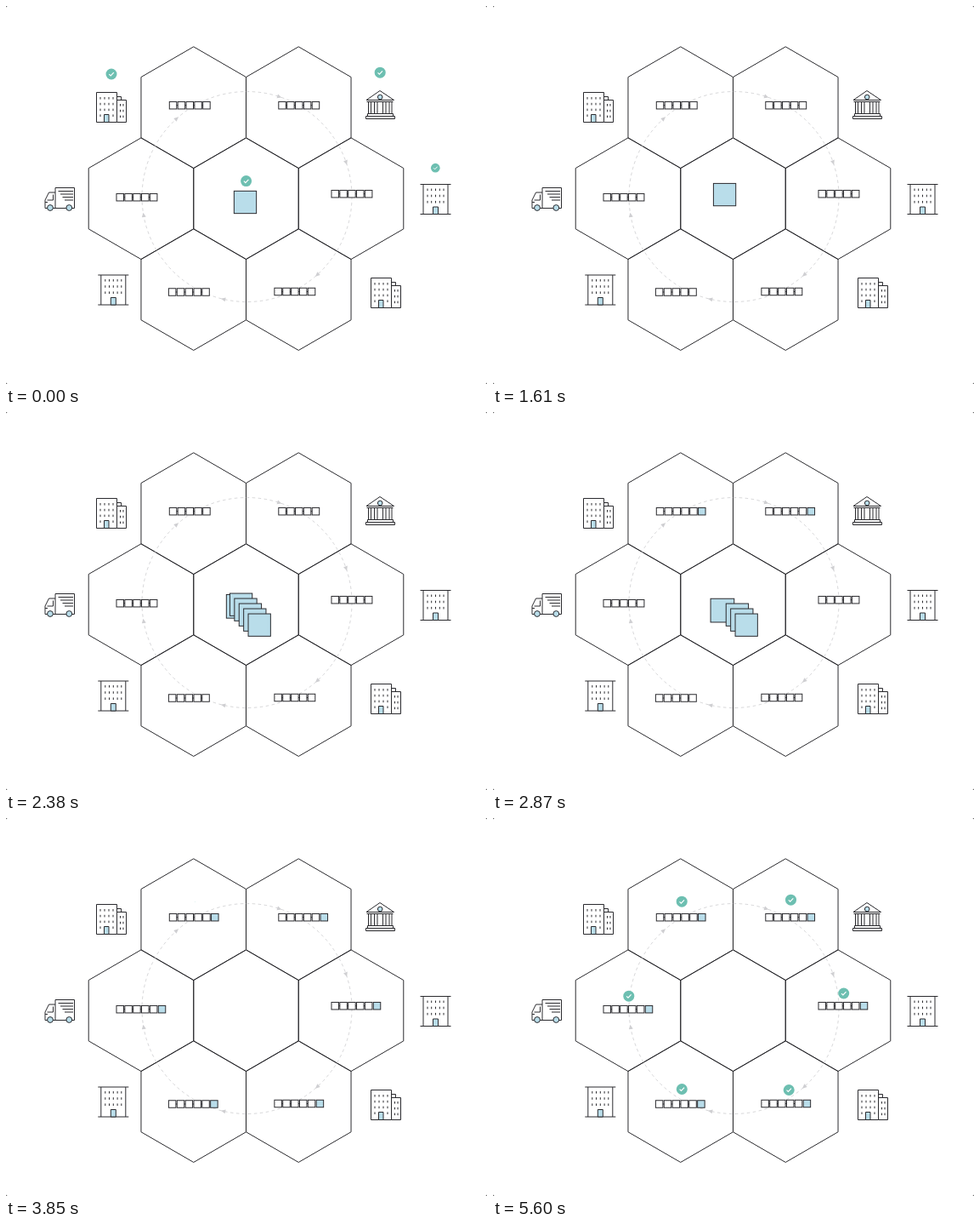
Animation, 566 px wide and 444 px high, one loop 6.09 s. Source, as an HTML page:

```html
<!DOCTYPE html>
<html lang="en">
<head>
<meta charset="utf-8">
<title>Hexagon network</title>
<style>
  html, body { margin: 0; width: 100%; height: 100%; overflow: hidden; background: #222; }
  svg { display: block; width: 100vw; height: 100vh; }
</style>
</head>
<body>
<svg id="stage" viewBox="0 0 566 444" fill="none" stroke="#2b2b2f" stroke-width="1">
  <defs>
    <g id="tower">
      <path fill="#fff" d="M24.5 5.5h5v4M24.5 9.5h11v26h-11z"/>
      <path fill="#fff" d="M.5.5h24v35H.5z"/>
      <path stroke-dasharray="2.6 4.2" d="M5 6v25M10 6v20M15 6v20M20 6v25M28.5 14v19M32 14v19"/>
      <path fill="#b9ddea" d="M9.5 26.5h5.5v9H9.5z"/>
    </g>
    <g id="office">
      <path d="M0 .5h36M0 35.5h36M3.5.5v35M32.5.5v35"/>
      <path stroke-dasharray="2.6 4.6" d="M8.5 5.5v18M13.2 5.5v18M18 5.5v18M22.8 5.5v18M27.5 5.5v18"/>
      <path fill="#b9ddea" d="M15 27h6v8.5h-6z"/>
    </g>
    <g id="tick" stroke="none">
      <circle r="6.5" fill="#6dbfb1"/>
      <path d="M-2.7.1L-.8 2 2.8-1.8" fill="none" stroke="#fff" stroke-width="1.2"/>
    </g>
  </defs>
  <rect width="566" height="444" rx="2" fill="#fff" stroke="none"/>
  <g id="hexes"></g>
  <g id="ring" stroke="#d6d6d8">
    <circle cx="283.5" cy="224" r="123.5" stroke-dasharray="3.5 3.5"/>
  </g>
  <g id="chains"></g>
  <use href="#tower" x="106" y="101"/>
  <use href="#tower" x="429" y="319"/>
  <use href="#office" x="487.5" y="209"/>
  <use href="#office" x="108.3" y="315.5"/>
  <g id="bank">
    <path d="M440 99.5L424 110.5h32.5zM424.5 112.5h31M426.5 113v13M429.5 113v13M433.5 113v13M437 113v13M443.5 113v13M447 113v13M451 113v13M454 113v13M425.5 126.5h30v3h-30zM423.5 129.5h34v3h-34z"/>
    <circle cx="440.2" cy="107" r="2.8" fill="#b9ddea"/>
  </g>
  <g id="truck">
    <path d="M58 237.5v-24h22.5v24zM58 219h-7.5l-4.5 9v9.5h12M48.5 228h7v-6.5M46 230.5h3M61.500 217.500H79M64 221H79M66.500 224.500H79M69 228H79"/>
    <circle cx="52" cy="237" r="3.4" fill="#b9ddea"/>
    <circle cx="74.300" cy="237" r="3.400" fill="#b9ddea"/>
  </g>
  <g id="squares" fill="#b9ddea"></g>
  <g id="ticks"></g>
</svg>
<script>
const LOOP = 6090, STAGGER = 245, POP = 270, FLY = 300;
const BLOCK = 8.5, PITCH = 9.85, BIG = 26.3;
const FLY_START = 2293, CHAIN_TICK_START = 3820, ICON_TICK_START = -622;
const FADE_START = 1050, FADE = 280;

// Clockwise from the upper left: left x and centre y of the blocks, then the tick
const chains = [
  { x: 192.3, y: 116.7, tick: [222.2, 98.2] },
  { x: 320.8, y: 116.7, tick: [350.5, 96.2] },
  { x: 383, y: 220.7, tick: [412.7, 206] },
  { x: 315.9, y: 335.5, tick: [348.2, 319.5] },
  { x: 191.4, y: 336, tick: [222.3, 318.5] },
  { x: 130, y: 224.7, tick: [159.8, 209.2] }
];
const iconSpots = [[124, 80], [440.2, 78.2], [505.3, 190.2], [447, 303.5], [126, 297.2], [63.2, 191.6]];
const hub = [281.5, 230.5], fanTop = [271.2, 220.2];

const $ = id => document.getElementById(id);
function add(parent, tag, attrs) {
  const el = document.createElementNS('http://www.w3.org/2000/svg', tag);
  for (const k in attrs) el.setAttribute(k, attrs[k]);
  return parent.appendChild(el);
}

const clamp = p => Math.min(1, Math.max(0, p));
const mix = (a, b, p) => a + (b - a) * p;
const smooth = p => p * p * (3 - 2 * p);
const span = (t, start, length) => clamp((t - start) / length);
const backIn = p => p * p * (2.70158 * p - 1.70158);
const pop = p => p < 0.6 ? 1.22 * (p / 0.6) ** 2 : mix(1.22, 1, smooth((p - 0.6) / 0.4));

function drawHex(cx, cy) {
  const points = [];
  for (let k = 0; k < 6; k++) {
    const a = (k * 60 - 90) * Math.PI / 180;
    points.push([cx + 71.35 * Math.cos(a), cy + 71.35 * Math.sin(a)].join());
  }
  add($('hexes'), 'polygon', { points: points.join(' ') });
}

function drawChain({ x, y }) {
  add($('chains'), 'path', { d: `M${x} ${y}h${PITCH * 4}` });
  for (let k = 0; k < 5; k++) {
    add($('chains'), 'rect', { x: x + k * PITCH, y: y - BLOCK / 2, width: BLOCK, height: BLOCK, fill: '#fff' });
  }
}

for (const x of [220.75, 344.25]) { drawHex(x, 119.2); drawHex(x, 333.1); }
for (const x of [159, 282.5, 406]) drawHex(x, 226.2);
for (const a of [-72, -19, 48, 103, 170, 228]) {
  add($('ring'), 'path', {
    d: 'M-2.5 0L-2.5 2.5 2.8 0-2.5-2.5z', fill: '#cfcfd2', stroke: 'none',
    transform: `translate(283.5 224) rotate(${a}) translate(123.5 0) rotate(90)`
  });
}
chains.forEach(drawChain);

const squares = chains.map(() => add($('squares'), 'rect', {}));
const newTick = () => add($('ticks'), 'use', { href: '#tick' });
const chainTicks = chains.map(newTick), iconTicks = iconSpots.map(newTick), hubTick = newTick();

function placeTick(el, [x, y], scale) {
  el.setAttribute('transform', `translate(${x} ${y}) scale(${Math.max(scale, 0)})`);
  el.style.display = scale > 0.01 ? '' : 'none';
}

function placeSquare(el, i, t) {
  const shift = smooth(span(t, 1310, 390));
  const fan = smooth(span(t, 1680, 560));
  const fly = backIn(span(t, FLY_START + i * STAGGER, FLY));
  const { x, y } = chains[i];
  const cx = mix(mix(hub[0], fanTop[0], shift) + 5.4 * i * fan, x + 5 * PITCH + BLOCK / 2, fly);
  const cy = mix(mix(hub[1], fanTop[1], shift) + 6 * i * fan, y, fly);
  const size = mix(BIG, BLOCK, fly);
  el.setAttribute('x', cx - size / 2);
  el.setAttribute('y', cy - size / 2);
  el.setAttribute('width', size);
  el.setAttribute('height', size);
}

function render(t) {
  const left = 1 - backIn(span(t, FADE_START, FADE));
  squares.forEach((el, i) => {
    // The lower squares stay hidden until the stack opens
    el.style.display = i === 0 || t > 1680 ? '' : 'none';
    placeSquare(el, i, t);
  });
  iconTicks.forEach((el, i) =>
    placeTick(el, iconSpots[i], left * pop(span(t, ICON_TICK_START + i * STAGGER, POP))));
  chainTicks.forEach((el, i) =>
    placeTick(el, chains[i].tick, pop(span(t, CHAIN_TICK_START + i * STAGGER, POP))));
  placeTick(hubTick, [282.6, 205.6], left);
}

const begin = performance.now();
function loop() {
  render((performance.now() - begin) % LOOP);
  requestAnimationFrame(loop);
}
loop();
</script>
</body>
</html>
```
